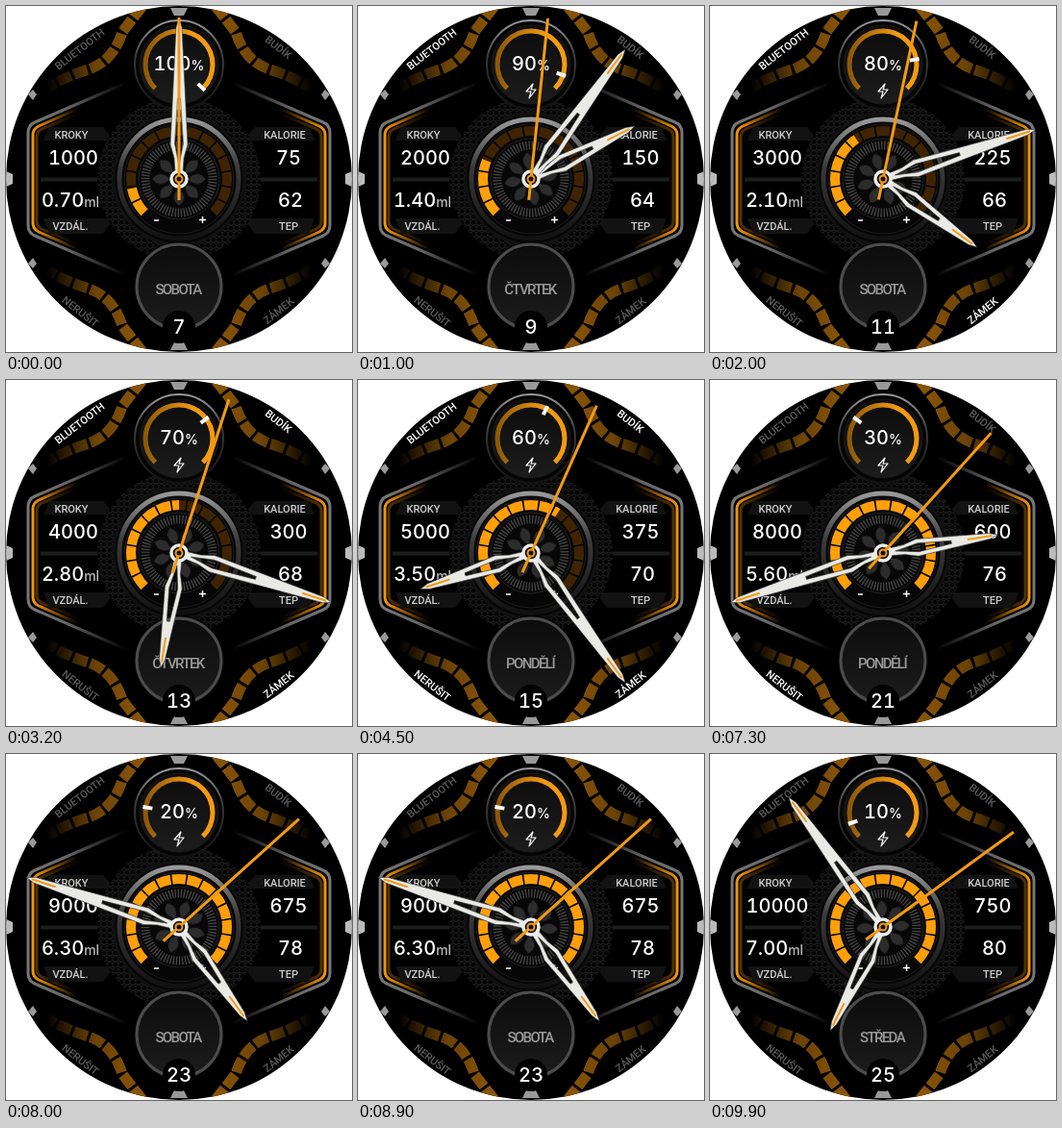
An HTML page that plays this animation: 360 px wide and 360 px high, repeating every 10000 ms.

```html
<!DOCTYPE html>
<html lang="cs">
<head>
<meta charset="utf-8">
<title>Ciferník</title>
<style>
html, body { margin: 0; width: 100%; height: 100%; overflow: hidden; background: #fff; }
svg { display: block; width: 360px; height: 360px; }
text { text-anchor: middle; fill: #fff; }
.value { font: 500 20px Inter, sans-serif; font-variant-numeric: tabular-nums; }
.unit { font-size: 14px; }
.label { font: 500 11px Roboto, sans-serif; fill: #ccc; }
.flag { font: 500 11px Roboto, sans-serif; }
#weekday { font: 500 15px Roboto, sans-serif; letter-spacing: -1.6px; fill: #999; }
</style>
</head>
<body>
<svg viewBox="0 0 360 360" fill="none">
  <defs>
    <clipPath id="face"><circle cx="180" cy="180" r="180"/></clipPath>
    <linearGradient id="metal" x2="0" y2="1">
      <stop stop-color="#999"/><stop offset=".4" stop-color="#3a3a3a"/><stop offset="1" stop-color="#111"/>
    </linearGradient>
    <linearGradient id="dark" x2="0" y2="1">
      <stop stop-color="#0c0c0c"/><stop offset="1" stop-color="#1c1c1c"/>
    </linearGradient>
    <linearGradient id="edge" gradientUnits="userSpaceOnUse" x1="26" x2="75">
      <stop stop-color="#f5980a"/><stop offset=".2" stop-color="#d98205"/><stop offset="1" stop-color="#d98205" stop-opacity="0"/>
    </linearGradient>
    <linearGradient id="streak" gradientUnits="userSpaceOnUse" x1="22" x2="125">
      <stop stop-color="#777"/><stop offset=".4" stop-color="#666"/><stop offset="1" stop-color="#666" stop-opacity="0"/>
    </linearGradient>
    <linearGradient id="bars" gradientUnits="userSpaceOnUse" x1="42" x2="142">
      <stop stop-color="#6b4206" stop-opacity="0"/><stop offset=".5" stop-color="#6b4206"/><stop offset="1" stop-color="#8a5508"/>
    </linearGradient>
    <linearGradient id="charge" gradientUnits="userSpaceOnUse" x1="143" x2="195">
      <stop stop-color="#8a5508"/><stop offset="1" stop-color="#f39a12"/>
    </linearGradient>
    <pattern id="mesh" width="6" height="6" patternUnits="userSpaceOnUse">
      <path d="M0 0L3 2L6 0M3 2V5M0 6L3 5L6 6" stroke="#222" stroke-width=".8"/>
    </pattern>

    <!-- One quarter of the case, mirrored into the others -->
    <g id="quarter">
      <path d="M142 0L121 27Q112 57 86 66Q62 73 42 86" stroke="url(#bars)" stroke-width="11" stroke-dasharray="15 3"/>
      <path d="M23 180V132Q23 124 30 121L125 80" stroke="url(#streak)" stroke-width="3"/>
      <path d="M28 180V134Q28 128 34 125L75 107" stroke="url(#edge)" stroke-width="3"/>
      <path d="M32 180V136Q32 131 37 128L75 112" stroke="url(#edge)" stroke-width="3" opacity=".35"/>
      <path d="M23 92L28 87L32 92L28 98Z" fill="#999"/>
    </g>
    <g id="side">
      <path d="M45 126H101L113 140H39ZM39 221H113L101 237H45Z" fill="#121212"/>
      <path d="M36 180.500H111" stroke="#1c1c1c" stroke-width="4"/>
      <path d="M0 172L7 175V185L0 188Z" fill="#bbb"/>
    </g>
  </defs>

  <g clip-path="url(#face)">
    <rect width="360" height="360" fill="#000"/>
    <use href="#quarter"/>
    <use href="#quarter" transform="matrix(-1 0 0 1 360 0)"/>
    <use href="#quarter" transform="matrix(1 0 0 -1 0 360)"/>
    <use href="#quarter" transform="rotate(180 180 180)"/>
    <use href="#side"/>
    <use href="#side" transform="matrix(-1 0 0 1 360 0)"/>
    <path d="M171 2H189L185 10H175ZM171 358H189L185 350H175Z" fill="#999"/>

    <!-- Centre gauge -->
    <circle cx="180" cy="180" r="85" fill="#050505"/>
    <circle cx="180" cy="180" r="85" fill="url(#mesh)"/>
    <circle cx="180" cy="180" r="68" fill="#050505" stroke="#111" stroke-width="3"/>
    <circle cx="180" cy="180" r="62" stroke="url(#metal)" stroke-width="5"/>
    <circle cx="180" cy="180" r="57" fill="#060606" stroke="#1c1c1c"/>
    <g transform="translate(180 180)" stroke-width="10">
      <path id="track" stroke="#3f2403"/>
      <path id="progress" stroke="#ff9f0a"/>
    </g>
    <circle cx="180" cy="180" r="42" fill="#080808" stroke="#222"/>
    <g id="gear"></g>
    <path d="M154 223H159M201 222.500H208M204.500 219V226" stroke="#fff" stroke-width="1.5"/>

    <!-- Battery gauge -->
    <circle cx="180" cy="61" r="46" fill="#050505" stroke="url(#metal)" stroke-width="2"/>
    <circle cx="180" cy="61" r="41" fill="url(#dark)" stroke="#181818"/>
    <path d="M155.200 85.800A35 35 0 1 1 204.800 85.800" stroke="url(#charge)" stroke-width="5"/>
    <path id="mark" d="M0-28V-38" stroke="#fff" stroke-width="4"/>
    <path d="M182 81L175 89H180L178 96L185 87H180Z" stroke="#fff" stroke-width="1.200" stroke-linejoin="round"/>

    <!-- Calendar dial -->
    <circle cx="180" cy="292" r="47" fill="#050505"/>
    <circle cx="180" cy="292" r="44" fill="url(#dark)" stroke="#4c4c4c" stroke-width="3"/>
    <circle cx="180" cy="334" r="17" fill="#000"/>
    <text id="weekday" x="179" y="300"></text>

    <text class="label" x="68" y="138">KROKY</text>
    <text class="label" x="67" y="233">VZDÁL.</text>
    <text class="label" x="290" y="138">KALORIE</text>
    <text class="label" x="294" y="233">TEP</text>
    <g class="value">
      <text id="steps" x="70" y="165"></text>
      <text x="67" y="209"><tspan id="distance"></tspan><tspan class="unit" fill="#bbb">ml</tspan></text>
      <text id="calories" x="294" y="165"></text>
      <text id="pulse" x="296" y="209"></text>
      <text x="180" y="67"><tspan id="battery"></tspan><tspan class="unit">%</tspan></text>
      <text id="day" x="180" y="341"></text>
    </g>
    <g id="flags"></g>

    <g id="hour"></g>
    <g id="minute"></g>
    <circle cx="180" cy="180" r="8" fill="#111" stroke="#eee" stroke-width="3.500"/>
    <path id="second" d="M0 22V-168" stroke="#f39a12" stroke-width="3"/>
    <circle cx="180" cy="180" r="3.500" fill="#111" stroke="#f39a12" stroke-width="2"/>
  </g>
</svg>
<script>
const $ = id => document.getElementById(id);
const DAYS = ["NEDĚLE", "PONDĚLÍ", "ÚTERÝ", "STŘEDA", "ČTVRTEK", "PÁTEK", "SOBOTA"];
// In the order in which they light up: text, x, y, rotation
const FLAGS = [
  ["BLUETOOTH", 79, 48, -38], ["ZÁMEK", 286, 320, -39],
  ["BUDÍK", 281, 46, 38], ["NERUŠIT", 75, 321, 38]
];

$("flags").innerHTML = FLAGS.map(([name, x, y, turn]) =>
  `<text class="flag" transform="translate(${x} ${y}) rotate(${turn})">${name}</text>`).join("");

// Skeleton hand: open near the hub, solid towards an orange tip
const hand = (length, slot) => `
  <path fill-rule="evenodd" fill="#e9e9e6" stroke="#333" stroke-width=".6"
    d="M-4-8L-5-22L-9-36L-3 ${9 - length}L0 ${-length}L3 ${9 - length}L9-36L5-22L4-8Z
       M0-13L-2-24L-4.500-37L-1.500 ${-slot}H1.500L4.500-37L2-24Z"/>
  <path d="M0 ${32 - length}V${6 - length}" stroke="#f39a12" stroke-width="2"/>`;
$("hour").innerHTML = hand(121, 72);
$("minute").innerHTML = hand(167, 84);

const petals = Array.from({ length: 8 }, (_, i) =>
  `<path transform="rotate(${i * 45})" d="M0-9Q-11-20 0-28Q11-20 0-9Z" fill="#2c2c2c" stroke="#111"/>`);
$("gear").innerHTML = `
  <circle r="35" stroke="#484848" stroke-width="9" pathLength="144" stroke-dasharray=".8 1.2"/>
  <circle r="29" fill="#070707"/>${petals.join("")}`;

function place(id, angle, y = 180) {
  $(id).setAttribute("transform", `translate(180 ${y}) rotate(${angle})`);
}

function polar(angle, r) {
  const a = angle * Math.PI / 180;
  return `${r * Math.sin(a)} ${-r * Math.cos(a)}`;
}

// Fifteen blocks of 18 degrees, cut off at the given part of the scale
function showBlocks(id, part) {
  const end = 270 * part - 135;
  let d = "";
  for (let a = -135; a < end; a += 18) {
    d += `M${polar(a + 1, 50)}A50 50 0 0 1 ${polar(Math.min(a + 17, end), 50)}`;
  }
  $(id).setAttribute("d", d);
}

function showState(n) {
  const charge = 100 - 10 * n;
  const date = new Date(2023, n, 7 + 2 * n);
  const texts = {
    steps: 1000 * (n + 1),
    distance: (0.7 * (n + 1)).toFixed(2),
    calories: 75 * (n + 1),
    pulse: 62 + 2 * n,
    battery: charge,
    day: date.getDate(),
    weekday: DAYS[date.getDay()]
  };
  for (const id in texts) $(id).textContent = texts[id];
  [...$("flags").children].forEach((flag, i) => {
    flag.style.fill = n > i && n <= i + 4 ? "#fff" : "#5c5c5c";
  });
  place("hour", 63 * n);
  place("minute", 36 * n);
  place("second", 6 * n);
  place("mark", 2.7 * charge - 135, 61);
  showBlocks("progress", Math.min(1, (n + 1) / 8));
}

showBlocks("track", 1);
let shown = -1;
function draw() {
  const t = performance.now() % 10000;
  const n = Math.floor(t / 1000);
  if (n !== shown) showState(shown = n);
  place("gear", Math.floor(t / 100) * 3.6);
  requestAnimationFrame(draw);
}
draw();
</script>
</body>
</html>
```
